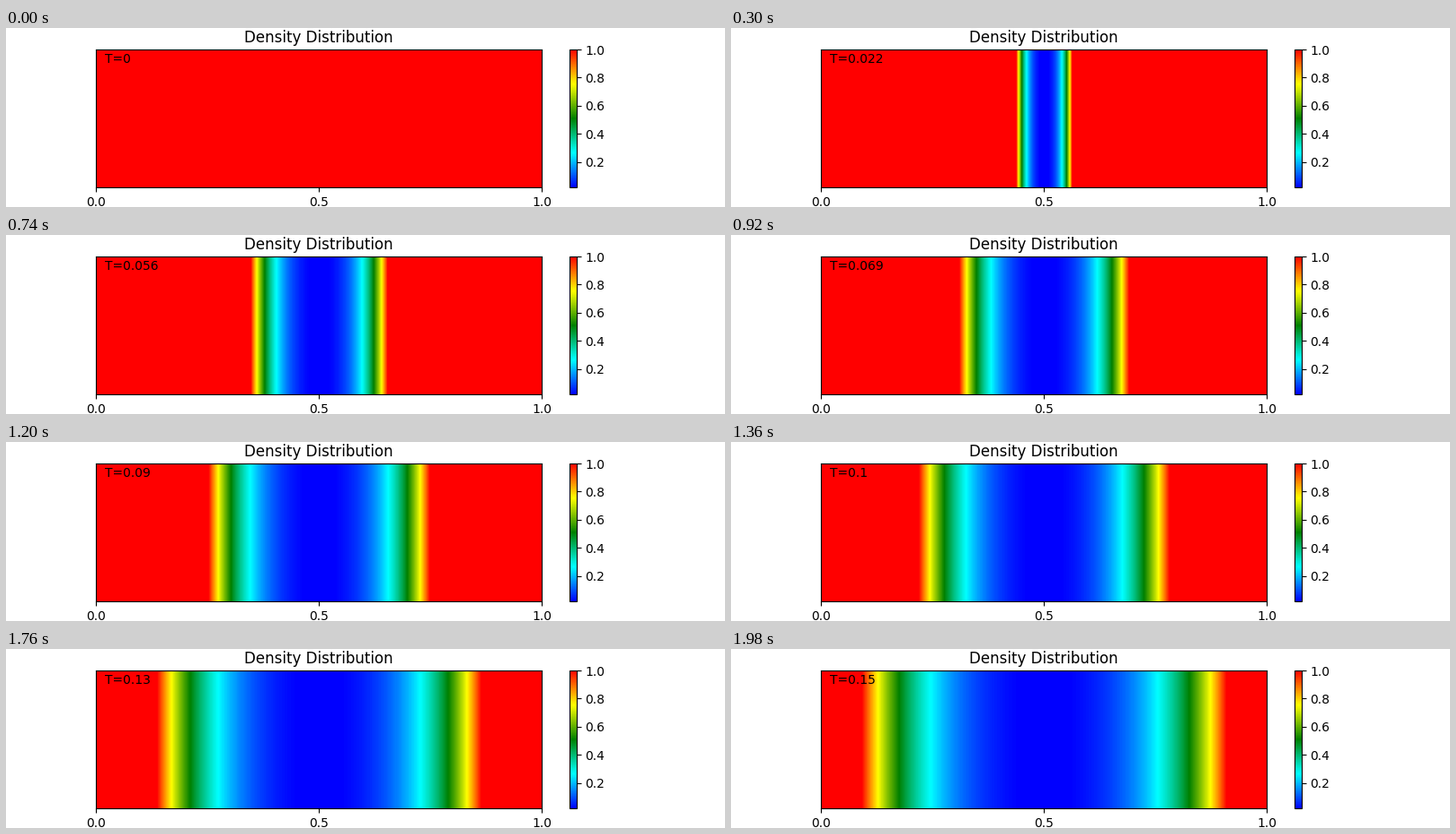
A matplotlib script for the animation above (2000 ms loop, 800 px wide and 200 px high).

```python
import numpy as np
import matplotlib.pyplot as plt
from matplotlib.animation import FuncAnimation
from matplotlib.colors import LinearSegmentedColormap

# Two gas streams pulled apart from the middle: exact double rarefaction.
GAMMA = 1.4
RHO0, U0, P0 = 1.0, 2.0, 0.4
C0 = np.sqrt(GAMMA * P0 / RHO0)
C_STAR = C0 - (GAMMA - 1) / 2 * U0

FRAMES = 100
DT = 0.0015
CELLS = 496

x = (np.arange(CELLS) + 0.5) / CELLS


def rho_from_c(c):
    return RHO0 * (c / C0) ** (2 / (GAMMA - 1))


def density(t):
    if t == 0:
        return np.full((1, CELLS), RHO0)
    xi = np.abs(x - 0.5) / t
    c = 2 / (GAMMA + 1) * (C0 + (GAMMA - 1) / 2 * (xi - U0))
    return rho_from_c(np.clip(c, C_STAR, C0))[np.newaxis, :]


cmap = LinearSegmentedColormap.from_list(
    "density", ["blue", "cyan", "green", "yellow", "red"])

fig, ax = plt.subplots(figsize=(8, 2), dpi=100)
image = ax.imshow(density(0), cmap=cmap, vmin=rho_from_c(C_STAR), vmax=RHO0,
                  extent=(0, 1, 0, 1), aspect="auto", interpolation="nearest")
fig.colorbar(image, ax=ax)
ax.set_title("Density Distribution")
ax.set_xticks([0, 0.5, 1])
ax.set_yticks([])
label = ax.text(0.02, 0.9, "T=0")


def update(i):
    t = i * DT
    image.set_data(density(t))
    label.set_text(f"T={t:.2g}")
    return image, label


anim = FuncAnimation(fig, update, frames=FRAMES, interval=20,
                     repeat=True, repeat_delay=0)
plt.show()
```
